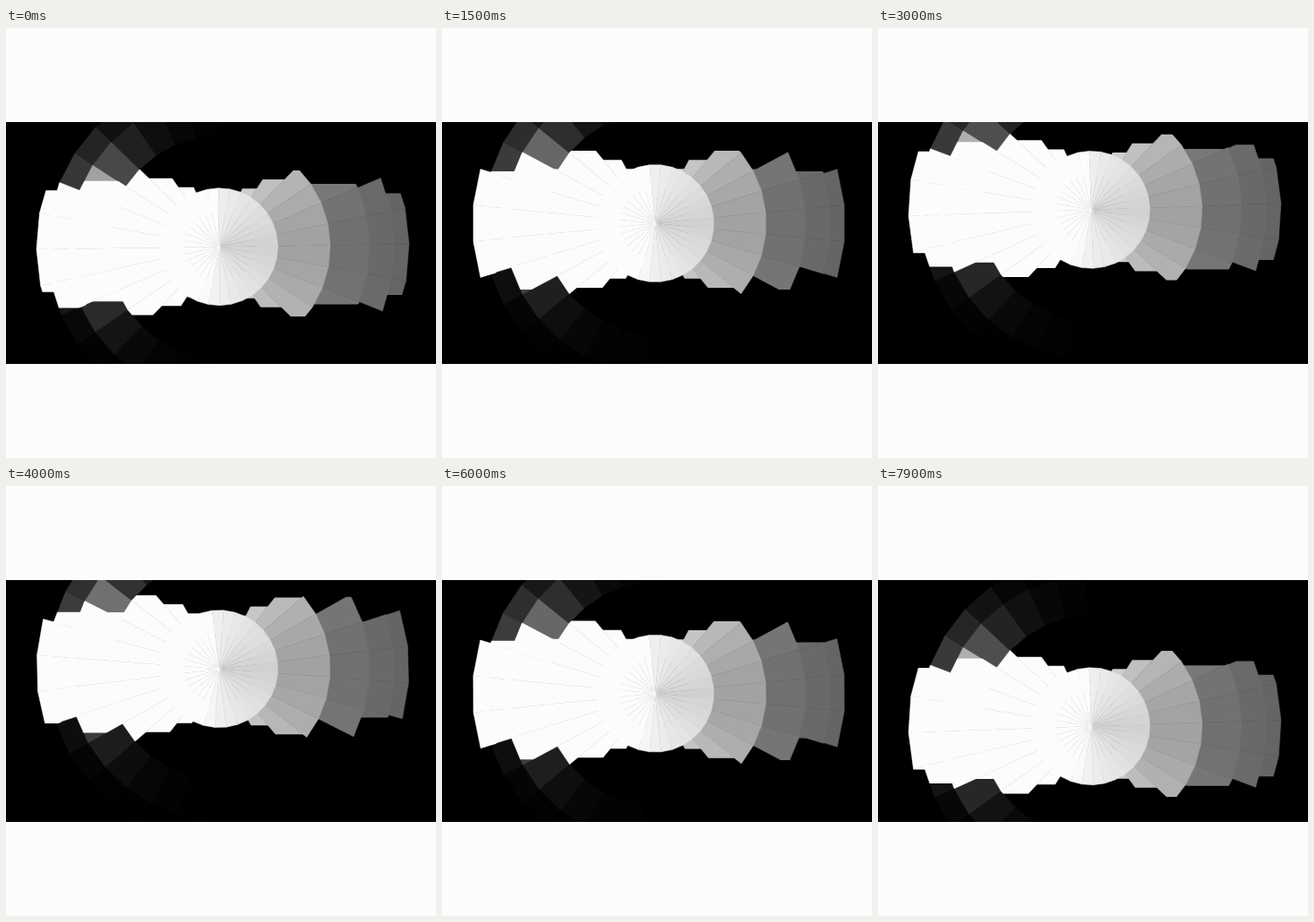
Write an HTML page with a canvas that moves like this. It is 480x480 px and loops after 8000 ms.

```html
<!DOCTYPE html>
<html>
<head>
<meta charset="utf-8">
<style>
html, body { margin: 0; width: 100%; height: 100%; overflow: hidden; background: #fcfcfc; }
canvas { display: block; width: 480px; height: 480px; }
</style>
</head>
<body>
<canvas id="stage" width="480" height="480"></canvas>
<script>
const ctx = document.getElementById('stage').getContext('2d');
const DEG = Math.PI / 180, SECTORS = 32, STEP = 360 / SECTORS;
const TURN = 2.755; // degrees per 100 ms

// Each ring is cut by a horizontal band whose half height depends on the sector's angle:
// half = base + gain * (pivot - angle).
const rings = [
  { inner: 190, outer: 208, shift: 4, base: 57, gain: 2, pivot: 19, shade: () => 101 },
  { inner: 164, outer: 194, shift: 2, base: 60, gain: 4, pivot: 22, shade: a => 105 + 8 * a * a },
  { inner: 122, outer: 168, shift: 0, base: 62, gain: 2, pivot: 33, shade: a => 112 + 30 * a * a },
  { inner: 40, outer: 124, shift: 0, base: 62, gain: 0.9, pivot: 66, shade: a => 162 + 36 * a * a }
];

const grey = level => {
  const v = Math.round(Math.max(0, Math.min(252, level)));
  return `rgb(${v},${v},${v})`;
};

// One flat facet between two radii, centred on angle mid (degrees).
function facet(inner, outer, mid, level, shift = 0) {
  const corner = (r, deg) => ctx.lineTo(shift + r * Math.cos(deg * DEG), r * Math.sin(deg * DEG));
  const from = mid - STEP / 2, to = mid + STEP / 2;
  ctx.beginPath();
  corner(inner, from);
  corner(outer, from);
  corner(outer, to);
  corner(inner, to);
  ctx.closePath();
  ctx.fillStyle = ctx.strokeStyle = grey(level);
  ctx.lineWidth = 0.5;
  ctx.fill();
  ctx.stroke();
}

// Dim facets on the left, fading toward the vertical.
function drawShadow(mid) {
  const rise = Math.asin(Math.sin(mid * DEG)) / DEG, steep = Math.abs(rise);
  if (Math.cos(mid * DEG) > 0 || steep < 14) return;
  if (rise < 0) {
    facet(168, 192, mid, 60 * Math.exp(-(((steep - 20) / 26) ** 2)));
    facet(124, 168, mid, 165 * Math.exp(-(steep - 27) / 14));
  } else {
    facet(168, 192, mid, 18 * Math.exp(-(steep - 20) / 11));
    facet(124, 168, mid, 48 * Math.exp(-(steep - 27) / 15));
  }
}

function drawCutFacet(ring, mid) {
  const steep = Math.abs(Math.asin(Math.sin(mid * DEG))) / DEG;
  const half = ring.base + ring.gain * (ring.pivot - steep);
  if (half < 10) return;
  const level = Math.cos(mid * DEG) < 0 ? 252 : ring.shade(mid * DEG);
  ctx.save();
  ctx.beginPath();
  ctx.rect(-240, -half, 480, 2 * half - 9);
  ctx.clip();
  facet(ring.inner, ring.outer, mid, level, ring.shift);
  ctx.restore();
}

function discShade(a) {
  if (a < -1.64) return 252;
  const quarter = Math.abs(a) / (Math.PI / 2);
  return quarter < 1 || a < 0 ? 209 + 30 * quarter : 239 + 60 * (quarter - 1);
}

function draw(step) {
  const spin = -0.8 - TURN * step;
  const phase = ((spin % STEP) + STEP) % STEP;
  const mids = Array.from({ length: SECTORS }, (_, i) => -180 + phase + (i + 0.5) * STEP)
    .map(a => a > 180 ? a - 360 : a);

  ctx.fillStyle = '#fcfcfc';
  ctx.fillRect(0, 0, 480, 480);
  ctx.save();
  ctx.beginPath();
  ctx.rect(0, 105, 480, 270);
  ctx.clip();
  ctx.fillStyle = '#000';
  ctx.fill();
  ctx.translate(238, 244.2 - 42 * Math.sin(TURN * step * DEG));

  mids.forEach(drawShadow);
  for (const ring of rings) mids.forEach(mid => drawCutFacet(ring, mid));
  for (const mid of mids) facet(0, 65.5, mid, discShade(mid * DEG));
  ctx.restore();
}

function tick(now) {
  // The first pose is held for two beats.
  draw(Math.max(0, Math.floor(now % 8000 / 100) - 1));
  requestAnimationFrame(tick);
}
requestAnimationFrame(tick);
</script>
</body>
</html>
```
